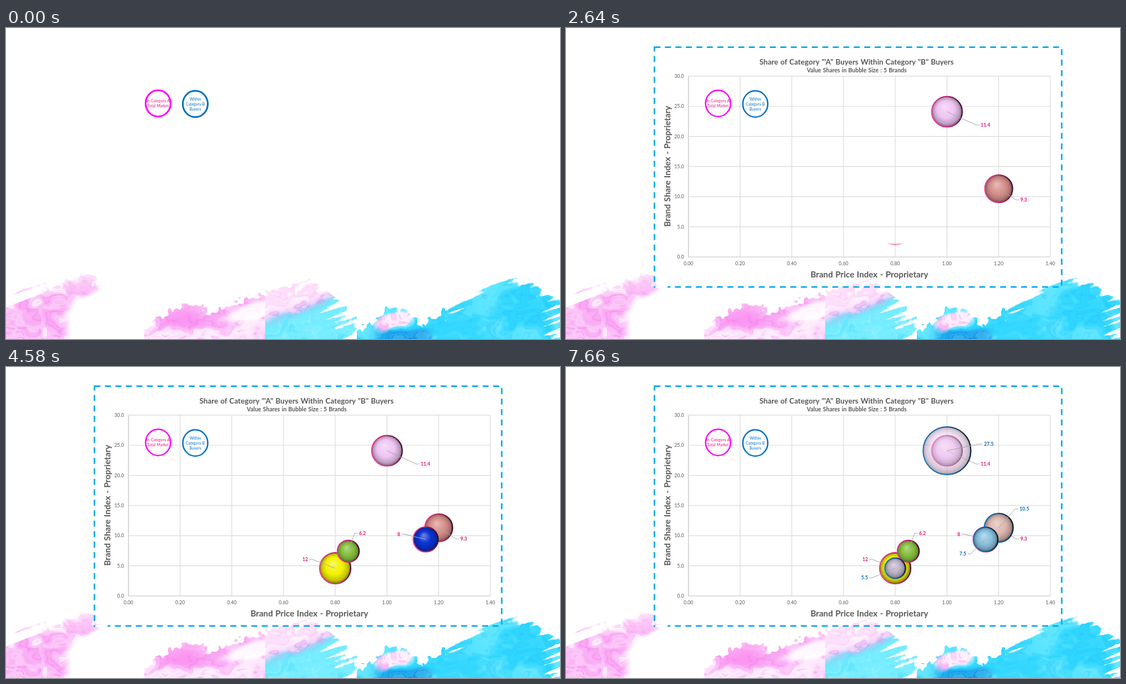
An HTML page with a canvas that plays this animation: 998x561 px, repeating every 8000 ms.

```html
<!DOCTYPE html>
<html lang="en">
<head>
<meta charset="utf-8">
<title>Bubble chart</title>
<style>
  html, body { margin: 0; width: 998px; height: 561px; overflow: hidden; background: #fff; }
  canvas, svg { position: absolute; left: 0; top: 0; }
  text { font-family: Lato, sans-serif; fill: #595959; word-spacing: .05em; }
  .bold { font-weight: 700; }
</style>
</head>
<body>
<canvas id="marble" width="998" height="561"></canvas>
<svg id="stage" width="998" height="561" viewBox="0 0 998 561">
  <defs>
    <radialGradient id="shade" fx=".42" fy=".33">
      <stop offset="0" stop-color="#fff" stop-opacity=".42"/>
      <stop offset=".5" stop-color="#fff" stop-opacity="0"/>
      <stop offset=".55" stop-color="#000" stop-opacity="0"/>
      <stop offset=".85" stop-color="#000" stop-opacity=".2"/>
      <stop offset="1" stop-color="#000" stop-opacity=".5"/>
    </radialGradient>
    <linearGradient id="pinkRim" x1="0" y1=".6" x2="1" y2=".4">
      <stop offset="0" stop-color="#f0409c"/><stop offset=".55" stop-color="#c8206f"/><stop offset="1" stop-color="#3c0a24"/>
    </linearGradient>
    <linearGradient id="blueRim" x1="0" y1=".6" x2="1" y2=".4">
      <stop offset="0" stop-color="#1f7cc4"/><stop offset=".55" stop-color="#0c5a98"/><stop offset="1" stop-color="#04182a"/>
    </linearGradient>
  </defs>
</svg>
<script>
const stage = document.getElementById('stage');
const PINK = '#e0147b', BLUE = '#0068b5';

function add(parent, tag, attrs, text) {
  const node = document.createElementNS('http://www.w3.org/2000/svg', tag);
  for (const key in attrs) node.setAttribute(key, attrs[key]);
  if (text) node.textContent = text;
  return parent.appendChild(node);
}

function label(parent, text, x, y, size, anchor = 'middle', extra = {}) {
  add(parent, 'text', { x, y, 'font-size': size, 'text-anchor': anchor, ...extra }, text);
}

// A group revealed from its bottom edge upwards behind a soft edge.
const wipes = [];
function wipeGroup(first, last, top, bottom) {
  const id = wipes.length, defs = stage.querySelector('defs');
  const gradient = add(defs, 'linearGradient', { id: 'edge' + id, gradientUnits: 'userSpaceOnUse', x1: 0, x2: 0 });
  add(gradient, 'stop', { offset: 0, 'stop-color': '#fff', 'stop-opacity': 0 });
  add(gradient, 'stop', { offset: 1, 'stop-color': '#fff' });
  const area = { x: 0, y: 0, width: 998, height: 561 };
  const mask = add(defs, 'mask', { id: 'wipe' + id, maskUnits: 'userSpaceOnUse', ...area });
  add(mask, 'rect', { ...area, fill: `url(#edge${id})` });
  const group = add(stage, 'g', {});
  wipes.push({ id, group, gradient, first, last, top, bottom });
  return group;
}

function legend(parent, width) {
  const ring = (cx, cy, color, fill, lines, y) => {
    const shape = { cx, cy, rx: 22.5, ry: 23.7 };
    add(parent, 'ellipse', { ...shape, fill: '#fff', stroke: '#fff', 'stroke-width': 4 });
    add(parent, 'ellipse', { ...shape, fill: 'none', stroke: color, 'stroke-width': width });
    lines.forEach((line, i) => label(parent, line, cx, y + i * 9, 6.9, 'middle', { style: `fill:${fill}` }));
  };
  ring(274, 136, '#f0f', '#ee1284', ['In Category A', 'Total Market'], 133.6);
  ring(341, 137, '#0070c0', '#0070c0', ['Within', 'Category B', 'Buyers'], 130.6);
}

function buildChart() {
  const chart = wipeGroup(330, 810, 33, 469);
  add(chart, 'rect', { x: 159.3, y: 34.7, width: 733.7, height: 432.5, fill: 'none', stroke: '#00a8ec',
    'stroke-width': 2.7, 'stroke-dasharray': '10.8 8.1' });
  add(chart, 'path', { d: 'M161 467.2H183', stroke: '#fff', 'stroke-width': 4 });
  for (let i = 0; i <= 7; i++) {
    const x = 220.5 + i * 93.14;
    add(chart, 'path', { d: `M${x} 87V413`, stroke: i ? '#d9d9d9' : '#bfbfbf', 'stroke-width': 1.2 });
    label(chart, (i * .2).toFixed(2), x, 428, 8.7);
  }
  for (let i = 0; i <= 6; i++) {
    const y = 413 - i * 54.35;
    add(chart, 'path', { d: `M220.5 ${y}H872.5`, stroke: i ? '#d9d9d9' : '#bfbfbf', 'stroke-width': 1.2 });
    label(chart, (i * 5).toFixed(1), 212.5, y + 3, 8.7, 'end');
  }
  const bold = { class: 'bold' };
  label(chart, 'Share of Category "\'A" Buyers Within Category "B" Buyers', 523.5, 66, 13.45, 'middle', bold);
  label(chart, 'Value Shares in Bubble Size : 5 Brands', 523.7, 80, 10.5, 'middle', bold);
  label(chart, 'Brand Price Index - Proprietary', 546.5, 449.5, 15.2, 'middle', bold);
  label(chart, 'Brand Share Index - Proprietary', 0, 0, 15.35, 'middle',
    { ...bold, transform: 'translate(187.5 249.5) rotate(-90)' });
  legend(chart, 2.5);
}

function bubble({ at, box, pos: [cx, cy], r, color, value, bend: [bx, by], blue, clear }) {
  const group = wipeGroup(...at, ...box);
  const side = bx > cx ? 1 : -1;
  const ball = { cx, cy, r: r - 1 };
  add(group, 'circle', { ...ball, fill: color, 'fill-opacity': clear ? .5 : 1 });
  add(group, 'circle', { ...ball, fill: 'url(#shade)', 'fill-opacity': clear ? .6 : 1 });
  add(group, 'circle', { ...ball, fill: 'none', stroke: `url(#${blue ? 'blue' : 'pink'}Rim)`, 'stroke-width': 2.2 });
  add(group, 'path', { d: `M${cx} ${cy}L${bx} ${by}h${side * 5.5}`, fill: 'none', stroke: '#a6a6a6' });
  label(group, value, bx + side * 8, by + 3.1, 8.7, side > 0 ? 'start' : 'end',
    { class: 'bold', style: `fill:${blue ? BLUE : PINK}` });
}

legend(stage, 3.1);
buildChart();
[
  { at: [1140, 1540], box: [122, 179], pos: [686.3, 151], r: 28.5, color: '#efc6f4', value: '11.4', bend: [739, 175] },
  { at: [1910, 2310], box: [264, 317], pos: [779.5, 290], r: 26, color: '#d7908b', value: '9.3', bend: [810.5, 310] },
  { at: [2640, 3080], box: [333, 393], pos: [593, 363], r: 29, color: '#f4f200', value: '12', bend: [552, 347] },
  { at: [3410, 3850], box: [286, 336], pos: [756, 311], r: 23.5, color: '#0a32d2', value: '8', bend: [718, 301.5] },
  { at: [4180, 4580], box: [297, 354], pos: [616.5, 332.3], r: 20.7, color: '#86c03c', value: '6.2', bend: [628, 300] },
  { at: [4950, 5390], box: [106, 196], pos: [686.3, 151], r: 44, color: '#efcdf2', value: '27.5', bend: [745, 139], blue: true, clear: true },
  { at: [5720, 6160], box: [253, 318], pos: [779.5, 290], r: 27, color: '#deb8b0', value: '10.5', bend: [809, 256], blue: true },
  { at: [6530, 6890], box: [343, 384], pos: [593, 363], r: 19.5, color: '#c0b6ca', value: '5.5', bend: [552, 380], blue: true },
  { at: [7260, 7660], box: [288, 340], pos: [756, 311], r: 23, color: '#8cc2e0', value: '7.5', bend: [729, 337], blue: true }
].forEach(bubble);

// Marbled paint along the bottom
const clamp = v => Math.min(1, Math.max(0, v));
const smooth = (a, b, v) => { const k = clamp((v - a) / (b - a)); return k * k * (3 - 2 * k); };
const mix = (a, b, k) => a.map((v, i) => v + (b[i] - v) * k);
const hash = (x, y) => { const n = Math.sin(x * 127.1 + y * 311.7) * 43758.5453; return n - Math.floor(n); };

function noise(x, y) {
  const i = Math.floor(x), j = Math.floor(y), u = smooth(0, 1, x - i), v = smooth(0, 1, y - j);
  const a = hash(i, j), b = hash(i, j + 1);
  return (a + (hash(i + 1, j) - a) * u) * (1 - v) + (b + (hash(i + 1, j + 1) - b) * u) * v;
}
const fbm = (x, y) => (noise(x, y) * 4 + noise(x * 2 + 7, y * 2) * 2 + noise(x * 4, y * 4 + 5)) / 7;

const crest = [[0, 488], [20, 476], [75, 448], [128, 440], [160, 447], [178, 462], [210, 500], [248, 561],
  [249, 541], [285, 516], [308, 498], [345, 501], [375, 514], [400, 497], [500, 468], [548, 452], [570, 468],
  [598, 490], [631, 515], [632, 546], [660, 527], [688, 504], [712, 507], [748, 534], [766, 522], [800, 502],
  [840, 476], [885, 453], [920, 450], [948, 458], [975, 480], [998, 490]];

function crestAt(x) {
  const i = Math.max(1, crest.findIndex(p => p[0] >= x));
  const [x0, y0] = crest[i - 1], [x1, y1] = crest[i];
  return y0 + (y1 - y0) * (x - x0) / (x1 - x0);
}

const WHITE = [255, 255, 255], ROSE = [250, 165, 244], MAGENTA = [230, 90, 220],
  LILAC = [176, 178, 240], AQUA = [120, 238, 255], CYAN = [48, 214, 254], AZURE = [10, 120, 220];

function paintAt(x, y) {
  const wx = fbm(x / 50, y / 38) * 2 - 1, wy = fbm(x / 50 + 9, y / 38 + 4) * 2 - 1;
  const v = fbm(x / 60 + wx * 1.8, y / 38 + wy * 1.8 + x / 150);
  const vein = (1 - Math.abs(Math.sin(v * 14))) ** 5;
  const tone = smooth(.28, .7, v);
  let pink = mix(mix(WHITE, ROSE, .2 + .75 * tone), MAGENTA, vein * .35);
  if (x < 249) {
    const limit = 106 + 64 * clamp((515 - y) / 45) + wx * 14;
    pink = mix(WHITE, pink, smooth(-8, 14, limit - x) * (.6 + .4 * smooth(455, 500, y)));
    return mix(pink, MAGENTA, smooth(50, 0, x) * smooth(535, 558, y) * vein);
  }
  if (x < 467) {
    const rise = y + (x - 440) * .25;
    const pool = smooth(1.2, .6, Math.hypot((x - 440) / 50, (rise - 513) / 15) + wx * .6);
    const blush = smooth(1.3, .3, Math.hypot((x - 318) / 50, (y - 522) / 22));
    return mix(mix(pink, [250, 130, 238], blush * .6), WHITE, pool * .85);
  }
  let sea = mix(AQUA, CYAN, x < 630 ? tone * .45 : .3 + .7 * tone);
  if (x < 632) {
    const depth = y - (531 - (x - 467) * .37) + wy * 14;
    const band = smooth(16, 0, Math.abs(depth)) * (.3 + .5 * vein);
    const pale = mix(pink, WHITE, .45 * smooth(-8, -28, depth));
    return mix(mix(pale, mix(sea, WHITE, vein * .25), smooth(-5, 5, depth)), LILAC, band);
  }
  if (x < 775) {
    const blot = smooth(1.1, .75, Math.hypot((x - 700 + (y - 526) * .5) / 27, (y - 526) / 22) + wx * .8);
    const deep = smooth(534, 552, y + wy * 22) * smooth(645, 690, x) * smooth(778, 750, x);
    return mix(mix(sea, AZURE, deep * (.5 + .5 * vein)), mix(pink, WHITE, .2), blot);
  }
  return mix(mix(sea, CYAN, smooth(880, 780, x) * .6), [20, 180, 245], vein * .3);
}

function coverAt(x, y, top) {
  let depth = y - top;
  const brushed = x < 185 || (x > 520 && x < 632) || x > 790;
  if (!brushed) return clamp(depth + (noise(x / 6, y / 6) - .5) * 18 - 1);
  if (x > 565 && x < 632) depth = Math.min(depth, (632 - x) * .5);
  if (x > 955) depth = Math.min(depth, (1005 - x) * .6);
  const stroke = noise((x * .94 - y * .34) / 75, (x * .34 + y * .94) / 5) * .85 + noise(x / 5, y / 4) * .15;
  return clamp(depth + .5) * clamp((stroke - .58 + depth / 62) * 9);
}

function paintMarble() {
  const context = document.getElementById('marble').getContext('2d');
  const top = 435, image = context.createImageData(998, 561 - top);
  for (let x = 0; x < 998; x++) {
    const edge = crestAt(x);
    for (let y = top; y < 561; y++) {
      const cover = coverAt(x, y, edge);
      if (cover > 0) image.data.set([...paintAt(x, y), cover * 255], ((y - top) * 998 + x) * 4);
    }
  }
  context.putImageData(image, 0, top);
}

function render(time) {
  for (const { id, group, gradient, first, last, top, bottom } of wipes) {
    const stepped = first + Math.floor((time - first) / 40) * 40;
    const progress = time < first ? 0 : clamp((stepped - first + 40) / (last - first + 8));
    const soft = (bottom - top) * .14;
    const y = bottom - progress * (bottom - top + soft);
    group.style.display = progress > 0 ? '' : 'none';
    gradient.setAttribute('y1', y);
    gradient.setAttribute('y2', y + soft);
    if (progress < 1) group.setAttribute('mask', `url(#wipe${id})`);
    else group.removeAttribute('mask');
  }
}

paintMarble();
const began = performance.now();
function tick() {
  render((performance.now() - began) % 8000);
  requestAnimationFrame(tick);
}
tick();
</script>
</body>
</html>
```
